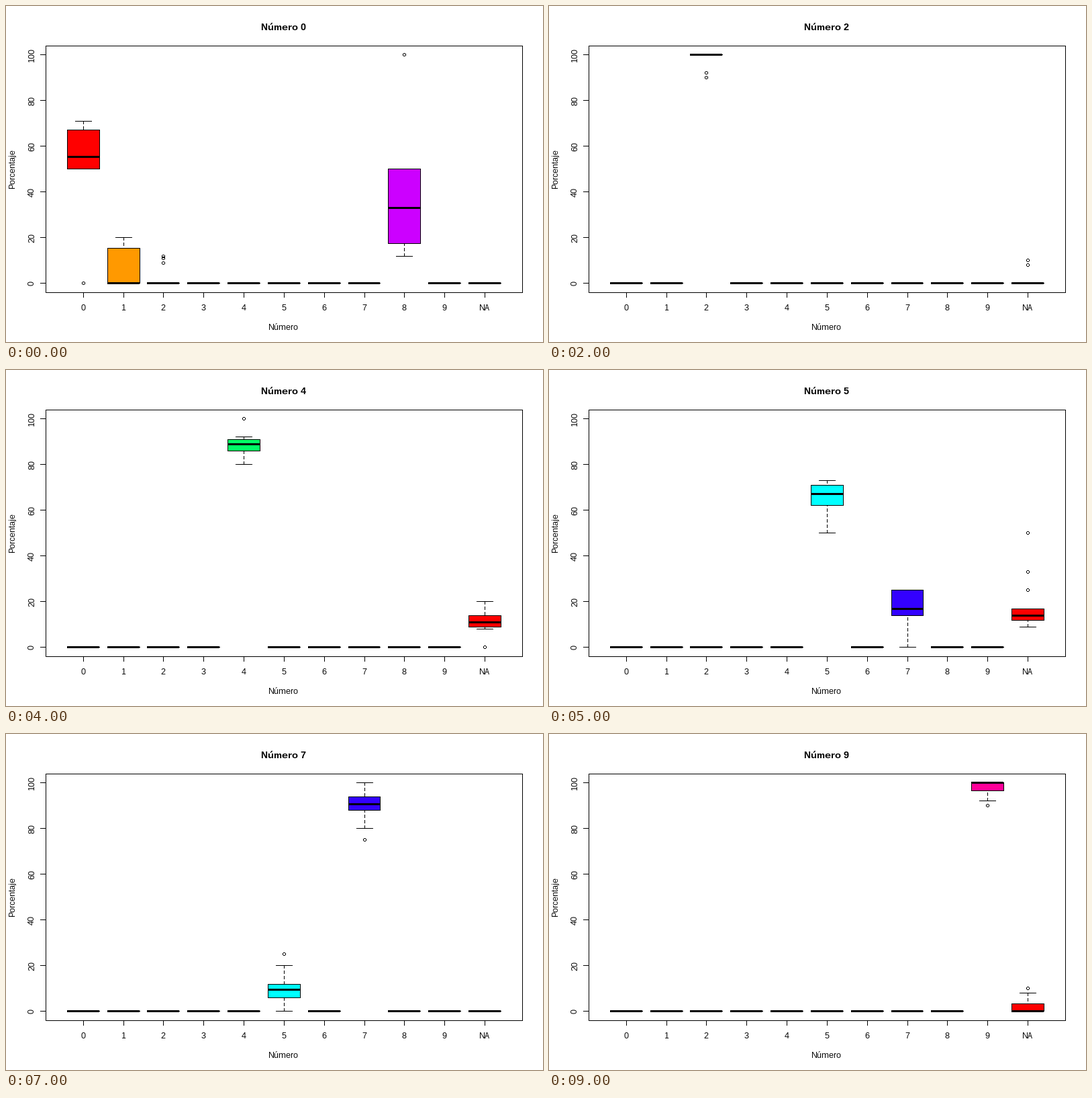
Animation of 800x500 px, one loop 10000 ms. Source, as a matplotlib script:

```python
import colorsys
import math

import matplotlib.pyplot as plt
import numpy as np
from matplotlib.animation import FuncAnimation
from matplotlib.patches import Rectangle

plt.rcParams["font.family"] = "Liberation Sans"
plt.rcParams["text.hinting"] = "native"
plt.rcParams["text.hinting_factor"] = 1

W, H, DPI = 800, 500, 100
LINE = 14.4                      # height of one margin line
LEFT, RIGHT = 4.1 * LINE, W - 2.1 * LINE
TOP, BOTTOM = 4.1 * LINE, H - 5.1 * LINE
STEP = (RIGHT - LEFT) / 11.88    # distance between columns
UNIT = (BOTTOM - TOP) / 108      # pixels per percent
NA = 10
LABELS = [str(d) for d in range(10)] + ["NA"]
COLORS = [colorsys.hsv_to_rgb(i % 10 / 10, 1, 1) for i in range(11)]

# Each person writes the digit n times; these are the values of n.
SIZES = {
    0: [1] + [2] * 6 + [3] * 2 + [5, 6, 6, 7, 8, 9, 11],
    2: [5] * 12 + [10, 12],
    3: [8] * 3 + [16, 20] * 2 + [13, 25],
    4: range(4, 13),
    5: [2, 3, 4] + [6, 7, 8] * 4 + [11],
    6: [1, 4, 6, 7, 10, 11, 11] + [13, 16] * 3,
    7: [2, 8, 16] * 2 + [4, 5, 10, 11],
    8: range(1, 13),
    9: [5] * 12 + [10, 12, 13, 14],
}
# How many of the n are read as another column.
MISREAD = {
    0: {1: lambda n: n // 5, 2: lambda n: n > 7, 8: lambda n: 1 + n // 9},
    2: {NA: lambda n: n > 9},
    3: {1: lambda n: n > 12, 2: lambda n: n > 20},
    4: {NA: lambda n: n > 4},
    5: {7: lambda n: n // 4, NA: lambda n: 1},
    6: {0: lambda n: n == 7 or n > 11, 3: lambda n: n > 11,
        4: lambda n: (n + 4) // 8, NA: lambda n: n > 9},
    7: {5: lambda n: n > 3},
    8: {0: lambda n: (n + 3) // 4, NA: lambda n: n > 7},
    9: {NA: lambda n: n > 9},
}

fig = plt.figure(figsize=(W / DPI, H / DPI), dpi=DPI, facecolor="white")
ax = fig.add_axes([0, 0, 1, 1])
ax.set_xlim(0, W)
ax.set_ylim(H, 0)
ax.axis("off")


def percentages(number):
    """Rounded percentages per column, one value for each person."""
    sizes = SIZES.get(number, [1])
    rules = MISREAD.get(number, {})
    table = {col: [0] for col in range(11)}
    for col, rule in rules.items():
        table[col] = [round(100 * rule(n) / n) for n in sizes]
    table[number] = [round(100 * (n - sum(r(n) for r in rules.values())) / n)
                     for n in sizes]
    return table


def summary(values):
    """Whiskers, hinges and median, then the outliers."""
    n = len(values)
    depth = (n + 3) // 2 / 2
    q1, mid, q3 = np.interp([depth, (n + 1) / 2, n + 1 - depth],
                            range(1, n + 1), sorted(values))
    reach = 1.5 * (q3 - q1)
    inside = [v for v in values if q1 - reach <= v <= q3 + reach]
    outside = set(values) - set(inside)
    return (min(inside), q1, mid, q3, max(inside)), outside


def px(col, offset=0.0):
    return math.floor(LEFT + (col + 0.94 + offset) * STEP)


def py(value):
    return math.floor(BOTTOM - (value + 4) * UNIT)


def bar(x0, y0, x1, y1, color="black"):
    """Fill whole pixels from (x0, y0) to (x1, y1), both included."""
    return ax.add_patch(Rectangle((x0, y0), x1 - x0 + 1, y1 - y0 + 1,
                                  facecolor=color, linewidth=0,
                                  antialiased=False))


def outline(x0, y0, x1, y1):
    return [bar(x0, y0, x1, y0), bar(x0, y1, x1, y1),
            bar(x0, y0, x0, y1), bar(x1, y0, x1, y1)]


def whisker(x, start, end):
    """Dashed vertical line that begins at the whisker's tip."""
    sign = 1 if end > start else -1
    parts = []
    for d in range(0, abs(end - start), 8):
        a = start + sign * d
        b = start + sign * min(d + 4, abs(end - start))
        parts.append(bar(x, min(a, b), x, max(a, b)))
    return parts


def ring(x, y):
    return [bar(x - 1, y - 2, x + 1, y - 2), bar(x - 1, y + 2, x + 1, y + 2),
            bar(x - 2, y - 1, x - 2, y + 1), bar(x + 2, y - 1, x + 2, y + 1)]


def box(col, values):
    stats, outside = summary(values)
    low, q1, mid, q3, high = map(py, stats)
    x, x0, x1 = px(col), px(col, -0.4), px(col, 0.4)
    parts = []
    if q1 != q3:
        parts.append(bar(x0, q3, x1, q1, COLORS[col]))
    parts.append(bar(x0, mid - 1, x1 - 1, mid + 1))
    for tip, edge in ((low, q1), (high, q3)):
        parts += whisker(x, tip, edge)
        parts.append(bar(px(col, -0.2), tip, px(col, 0.2), tip))
    for value in outside:
        parts += ring(x, py(value))
    return parts + outline(x0, q3, x1, q1)


def label(x, y, text, size=12, **kw):
    return ax.text(x, y, text, fontsize=size * 72 / DPI, ha="center",
                   va="baseline", rotation_mode="anchor", **kw)


def draw_axes():
    x0, x1, y0, y1 = map(math.floor, (LEFT, RIGHT, TOP, BOTTOM))
    outline(x0, y0, x1, y1)
    for col, name in enumerate(LABELS):
        bar(px(col), y1, px(col), y1 + 7)
        label(px(col), 453, name)
    for value in range(0, 101, 20):
        y = py(value)
        bar(x0 - 8, y, x0, y)
        label(42, y + 0.5, str(value), rotation=90)
    label(413.5, 482, "Número")
    label(13, 242.5, "Porcentaje", rotation=90)


draw_axes()
title = label(413.5, 36, "", 14.4, weight="bold")
shown = []


def update(number):
    while shown:
        shown.pop().remove()
    title.set_text(f"Número {number}")
    for col, values in percentages(number).items():
        shown.extend(box(col, values))
    return [title, *shown]


anim = FuncAnimation(fig, update, frames=10, interval=1000,
                     init_func=lambda: update(0), repeat=True,
                     repeat_delay=0, blit=False)
plt.show()
```
